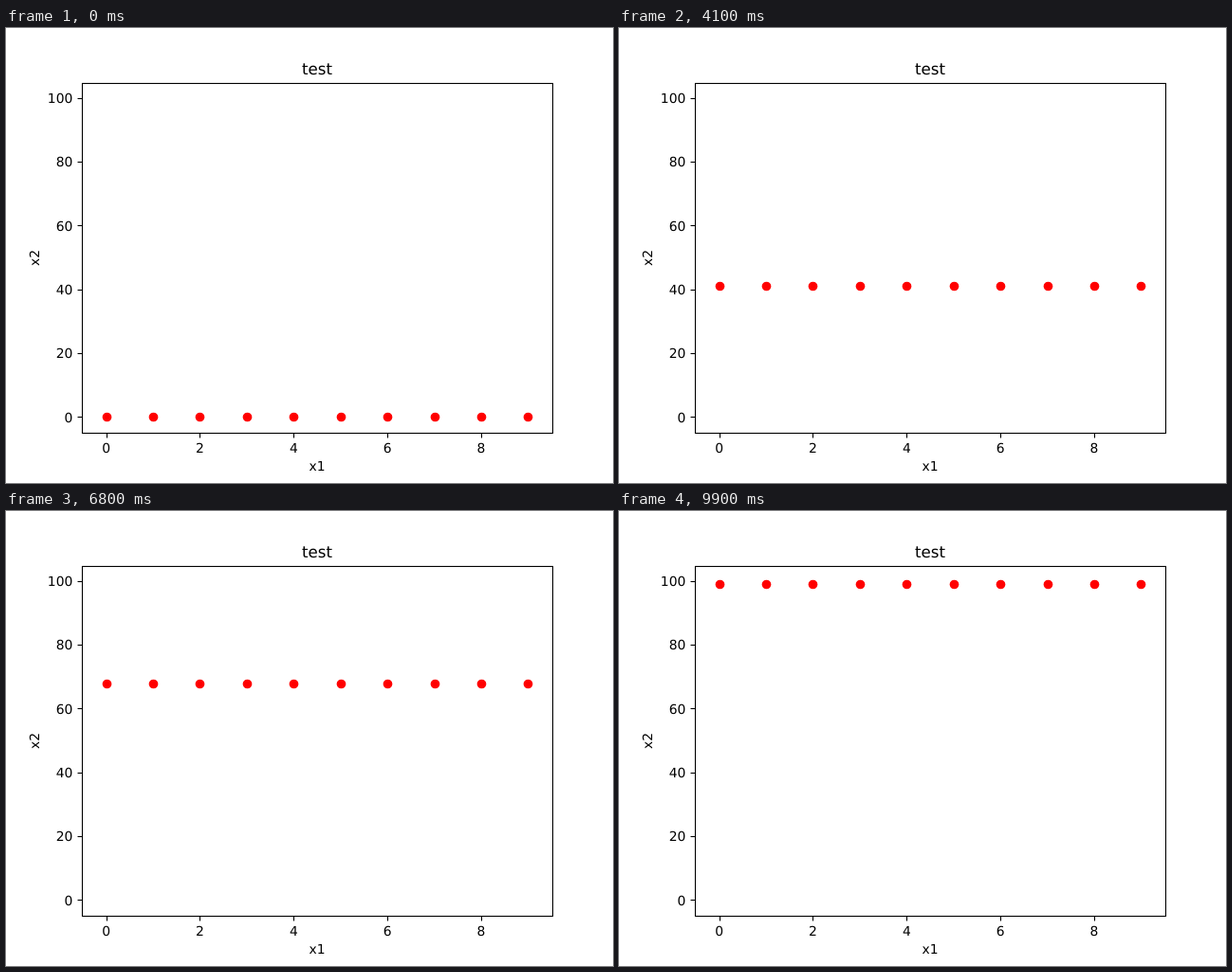
Write an HTML page that moves like this. It is 640x480 px and loops after 10 s.

```html
<!DOCTYPE html>
<html lang="en">
<head>
<meta charset="utf-8">
<title>test</title>
<style>
  html, body { margin: 0; width: 100%; height: 100%; overflow: hidden; background: #fff; }
  svg { display: block; width: 640px; height: 480px; }
  text { font: 13.889px "DejaVu Sans", sans-serif; text-anchor: middle; text-rendering: geometricPrecision; }
  .title { font-size: 16.667px; }
  .right { text-anchor: end; }
  .lines { fill: none; stroke: #000; stroke-width: 1.11; }
  #dots { fill: #f00; }
</style>
</head>
<body>
<svg viewBox="0 0 640 480">
  <g id="dots"></g>
  <g id="axes">
    <rect class="lines" x="80.5" y="58.5" width="496" height="369"/>
    <text class="title" x="328" y="49">test</text>
    <text x="328" y="467">x1</text>
    <text transform="translate(35 242.4) rotate(-90)">x2</text>
  </g>
</svg>
<script>
  const STEP = 100, STEPS = 100;
  const dots = document.getElementById("dots");
  const axes = document.getElementById("axes");

  const plotX = x => 105.57 + 49.43 * x;
  const plotY = y => 410.4 - 3.365 * y;
  const snap = p => Math.round(p) + 0.5;

  function add(parent, tag, attrs, label = "") {
    const node = document.createElementNS("http://www.w3.org/2000/svg", tag);
    for (const key in attrs) node.setAttribute(key, attrs[key]);
    node.textContent = label;
    parent.append(node);
  }

  for (let x = 0; x <= 8; x += 2) {
    add(axes, "path", { class: "lines", d: `M${snap(plotX(x))} 427.5v5` });
    add(axes, "text", { x: plotX(x), y: 448 }, x);
  }
  for (let y = 0; y <= 100; y += 20) {
    add(axes, "path", { class: "lines", d: `M80.5 ${snap(plotY(y))}h-5` });
    add(axes, "text", { class: "right", x: 70.3, y: Math.round(plotY(y) + 5.28) }, y);
  }
  for (let x = 0; x < 10; x++) {
    add(dots, "circle", { cx: snap(plotX(x)), cy: 0, r: 4.86 });
  }

  // The row climbs one unit per step, snapped to whole pixels.
  function draw() {
    const value = Math.floor(performance.now() / STEP) % STEPS;
    dots.setAttribute("transform", `translate(0 ${snap(plotY(value))})`);
    requestAnimationFrame(draw);
  }
  draw();
</script>
</body>
</html>
```
